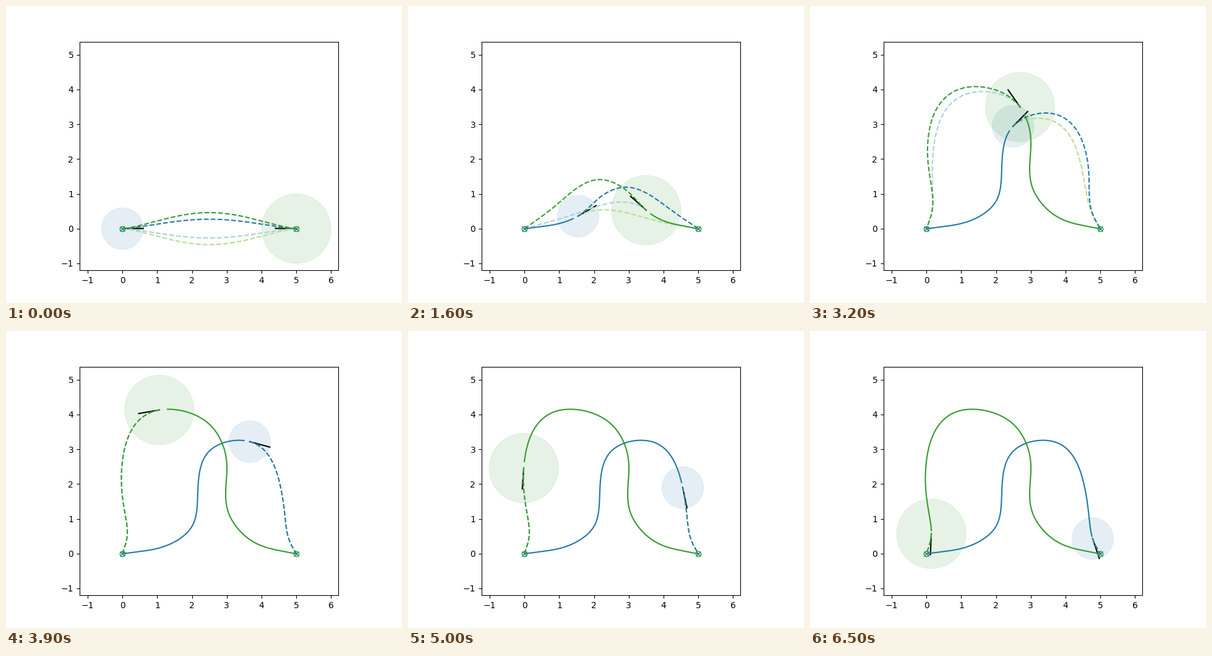
These frames come from a looping animation (640x480 px, 6600 ms). A matplotlib script:

```python
import numpy as np
import matplotlib.pyplot as plt
from matplotlib.animation import FuncAnimation

FRAMES, HORIZON, SUB = 66, 72, 8
KEYS = (0, 8, 16, 25, 39)  # the plans have settled by the last one
TAU = np.linspace(0, HORIZON, HORIZON * SUB + 1)


def cubic(t, p, x, d0):
    """Cubic spline through p(t) with start slope d0 and a natural end."""
    h, n = np.diff(t), len(t)
    sec = np.diff(p, axis=0) / h[:, None]
    A, b = np.eye(n), np.zeros_like(p)
    b[0] = d0
    for i in range(1, n - 1):
        A[i, i - 1:i + 2] = h[i], 2 * (h[i - 1] + h[i]), h[i - 1]
        b[i] = 3 * (h[i] * sec[i - 1] + h[i - 1] * sec[i])
    A[-1, -2:], b[-1] = (1, 2), 3 * sec[-1]
    m = np.linalg.solve(A, b)
    i = np.clip(np.searchsorted(t, x, side="right") - 1, 0, n - 2)
    u, hi = ((x - t[i]) / h[i])[:, None], h[i][:, None]
    return ((1 + 2 * u) * (1 - u)**2 * p[i] + u * (1 - u)**2 * hi * m[i]
            + u**2 * (3 - 2 * u) * p[i + 1] + u**2 * (u - 1) * hi * m[i + 1])


def lengths(p):
    return np.append(0, np.cumsum(np.hypot(*np.diff(p, axis=0).T)))


class Robot:
    def __init__(self, stops, radius, light, dark):
        stops = np.array(stops, float)
        self.start, self.goal = stops[0, 1:], stops[-1, 1:]
        d0 = 0.004 * (self.goal - self.start)
        self.pos = cubic(stops[:, 0], stops[:, 1:], TAU, d0)
        v = np.gradient(self.pos, axis=0)
        self.dir = v / np.hypot(*v.T)[:, None]
        self.radius, self.light, self.dark = radius, light, dark

    def bow(self, height):
        w = TAU / HORIZON
        xy = self.start + w[:, None] * (self.goal - self.start)
        xy[:, 1] = height * np.abs(np.sin(np.pi * w))**1.4
        return xy

    def via(self, key, points):
        """Driven part up to the key time, then a curve through the points."""
        j = key * SUB
        p = np.array([self.pos[j], *points, self.goal])
        t = lengths(p)
        xy = cubic(t, p, np.linspace(0, t[-1], 1500), self.dir[j])
        s = lengths(xy)
        w = (TAU[j:] - key) / (HORIZON - key)
        want = s[-1] * (1 - (1 - w)**1.4)
        rest = np.column_stack([np.interp(want, s, c) for c in xy.T])
        return np.vstack([self.pos[:j], rest])

    def plans(self, height, *vias):
        return [self.bow(height), *map(self.via, KEYS[1:], vias), self.pos]

    def plan(self, plans, i):
        j = i * SUB
        k = np.searchsorted(KEYS, i, side="right") - 1
        if k == len(KEYS) - 1:
            return self.pos[j:]
        a = (i - KEYS[k]) / (KEYS[k + 1] - KEYS[k])
        if k == len(KEYS) - 2:
            a = 1 - (1 - a)**2
        xy = (1 - a) * plans[k][j:] + a * plans[k + 1][j:]
        fade = np.linspace(1, 0, len(xy))[:, None]**4
        return xy + (self.pos[j] - xy[0]) * fade


# Stops are (frame, x, y).
blue = Robot([(0, 0, 0), (8, .5, .06), (16, 1.54, .36), (20, 2.02, .82),
              (25, 2.165, 1.73), (32, 2.49, 2.94), (39, 3.66, 3.22),
              (50, 4.55, 1.9), (65, 4.78, .43), (72, 5, 0)],
             .6, "#aacfe2", "#2378a8")
green = Robot([(0, 5, 0), (8, 4.5, .09), (16, 3.5, .53), (20, 3.07, 1.12),
               (25, 2.98, 2), (29.5, 2.95, 2.92), (33, 2.52, 3.7),
               (39, 1.06, 4.13), (50, -.02, 2.46), (65, .14, .57), (72, 0, 0)],
              1, "#b5dd90", "#339c2e")

blue_plans = blue.plans(
    .27, [(2.6, .445), (4.13, .18)],
    [(2.17, .9), (2.88, 1.19), (4.21, .54)],
    [(2.42, 2.99), (3.54, 3.62), (4.48, 3.19), (4.84, 2.14), (4.66, .75)])
green_plans = green.plans(
    .46, [(2.43, .655), (.92, .27)],
    [(2.97, 1.07), (2.15, 1.41), (.92, .68)],
    [(2.65, 3.35), (1.6, 3.83), (.44, 3.26), (.21, 2.2), (.36, .75)])
guess_of_green = green.plans(
    -.27, [(3.41, .13), (1.81, -.12)],
    [(2.88, .76), (1.63, .48)],
    [(2.7, 2.85), (2.13, 3.1), (1.27, 2.63), (.65, 1.07)])
guess_of_blue = blue.plans(
    -.46, [(1.01, .07), (2.88, -.3)],
    [(2.1, .53), (3.77, .23)],
    [(2.52, 2.62), (3.02, 2.78), (3.9, 2.14), (4.39, .8)])

fig, ax = plt.subplots(figsize=(6.4, 4.8), dpi=100)
ax.set_aspect("equal")
ax.set(xlim=(-1.232, 6.207), ylim=(-1.2, 5.376))


def line(color, style, z):
    return ax.plot([], [], style, color=color, lw=1.5, zorder=z)[0]


views = []
for me, plans, other, guess in ((blue, blue_plans, green, guess_of_green),
                                (green, green_plans, blue, guess_of_blue)):
    disc = ax.add_patch(plt.Circle(me.start, me.radius, color=me.dark, alpha=.12, lw=.5))
    ax.plot(*me.start, "o", mfc="none", color=me.dark, mew=1, zorder=3)
    ax.plot(*me.goal, "x", color=me.dark, zorder=3)
    views.append((me, plans, other, guess, disc, line("k", "-", 2),
                  line(me.dark, "-", 2.3), line(me.light, "--", 2.1),
                  line(me.dark, "--", 2.2)))


def update(i):
    j = i * SUB
    for me, plans, other, guess, disc, nose, trail, faint, ahead in views:
        disc.center = me.pos[j]
        nose.set_data(*np.array([me.pos[j], me.pos[j] + .6 * me.dir[j]]).T)
        trail.set_data(*me.pos[:max(j - SUB, 0) + 1].T)
        faint.set_data(*other.plan(guess, i).T)
        ahead.set_data(*me.plan(plans, i).T)


anim = FuncAnimation(fig, update, frames=FRAMES, interval=100, repeat=True, repeat_delay=0)
plt.show()
```
